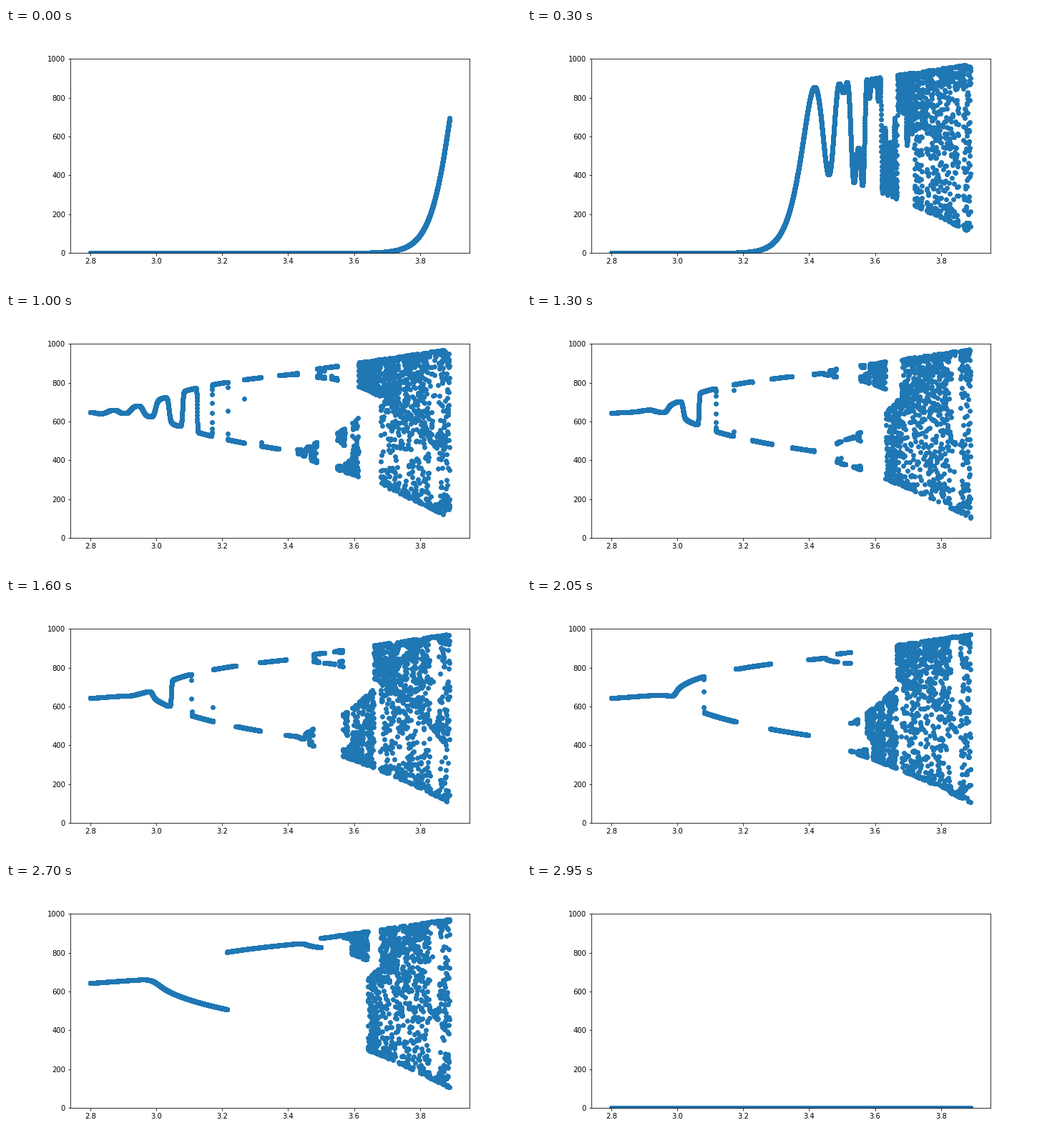
Recreate the animation shown at these times as a matplotlib script. Size 720x360 px, loop 3000 ms.

```python
import numpy as np
import matplotlib.pyplot as plt
from matplotlib.animation import FuncAnimation

FRAMES = 60
INTERVAL = 50        # ms
GENERATIONS = 100
CAPACITY = 1000
PAD = 0.06042        # room left and right of the data

rates = np.linspace(2.8, 3.89, 5000)


def population(start):
    """Logistic growth after all generations, one value per growth rate."""
    x = np.full_like(rates, start)
    for _ in range(GENERATIONS):
        x = rates * x * (1 - x / CAPACITY)
    return x


fig, ax = plt.subplots(figsize=(10, 5), dpi=72)
fig.subplots_adjust(left=0.125, right=0.9, bottom=0.125, top=0.88)
ax.set_xlim(rates[0] - PAD, rates[-1] + PAD)
ax.set_ylim(0, CAPACITY)
dots = ax.scatter(rates, np.zeros_like(rates), s=36, color="#1f77b4")


def update(i):
    # the starting population grows tenfold per step, up to full capacity
    start = CAPACITY * 10.0 ** (i + 1 - FRAMES)
    dots.set_offsets(np.column_stack([rates, population(start)]))
    return (dots,)


anim = FuncAnimation(fig, update, frames=FRAMES, interval=INTERVAL,
                     repeat=True, repeat_delay=0)
plt.show()
```
